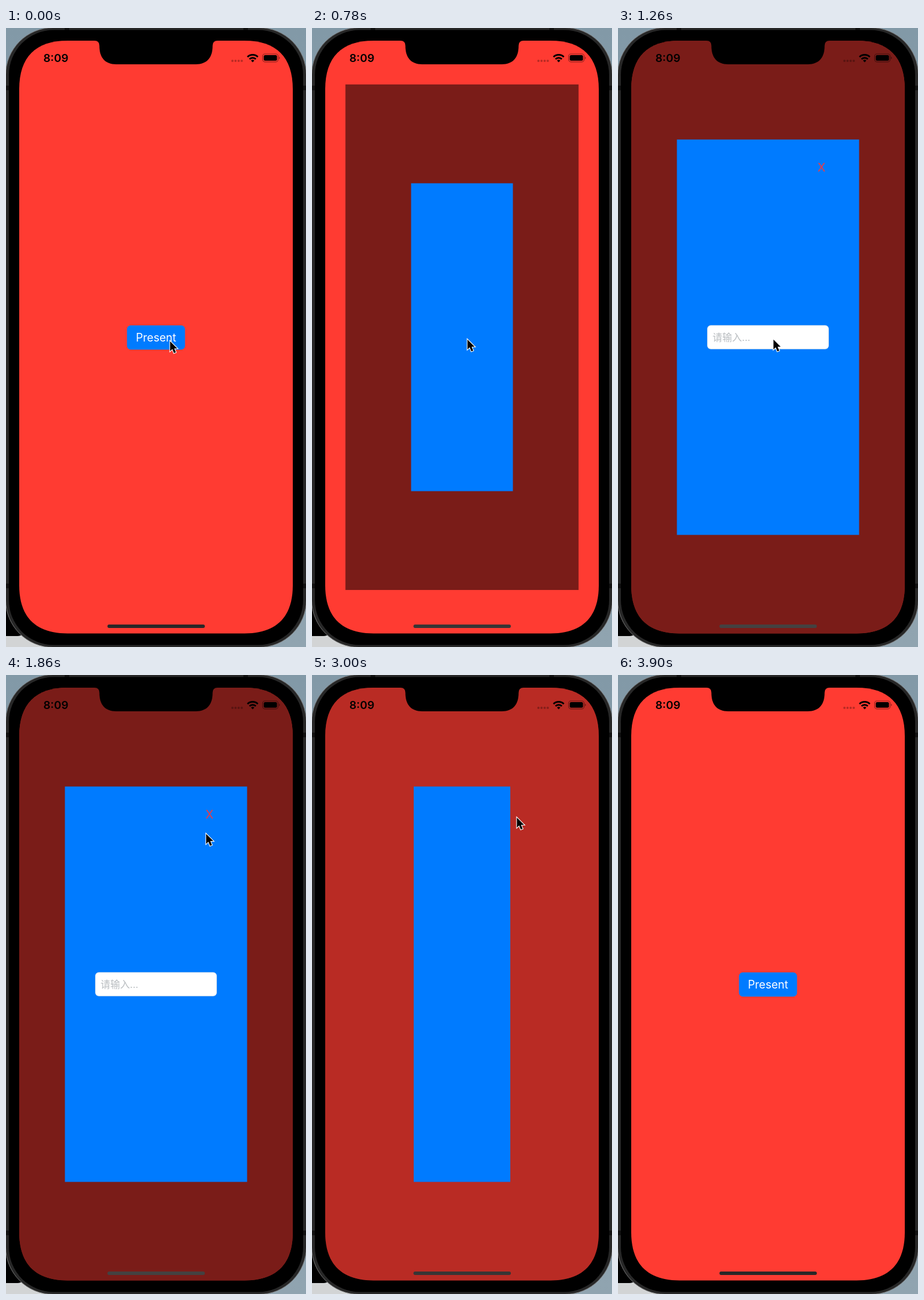
Animation of 522x1074 px, one loop 4200 ms. Source, as an HTML page:

```html
<!DOCTYPE html>
<html lang="en">
<head>
<meta charset="utf-8">
<title>Modal presentation</title>
<style>
html, body { margin: 0; width: 100%; height: 100%; overflow: hidden; background: #000; }
svg { display: block; width: 522px; height: 1074px; }
text { font-family: Inter, "Noto Sans CJK SC", "Noto Sans CJK", sans-serif; }
</style>
</head>
<body>
<svg viewBox="0 0 522 1074">
  <defs>
    <linearGradient id="desk" x2="0" y2="1">
      <stop offset="0" stop-color="#8299a7"/><stop offset="1" stop-color="#90a4b0"/>
    </linearGradient>
    <clipPath id="screen">
      <path d="M107 22H415C470.500 22 499 50.500 499 106V967C499 1022 470.500 1050.500 415 1050.500H107C51.500 1050.500 23 1022 23 967V106C23 50.500 51.500 22 107 22Z"/>
    </clipPath>
    <clipPath id="fieldClip"><rect id="fieldMask" y="516" height="41"/></clipPath>
  </defs>

  <!-- desktop and phone body -->
  <rect width="522" height="1074" fill="url(#desk)"/>
  <path d="M0 1000H110V1074H0Z" fill="#d2d4d5"/>
  <rect x="-30" y="1000" width="64" height="55" rx="14"/>
  <rect x="-.5" y="-.5" width="523" height="1075" rx="82" fill="#272727" stroke="#777"/>
  <path d="M0 104H5M0 968H5M517 104H522M517 968H522M106 0V4M417 0V4" stroke="#111" stroke-width="8"/>
  <rect x="5" y="3.500" width="512" height="1067" rx="78"/>

  <g clip-path="url(#screen)">
    <rect x="20" y="20" width="482" height="1034" fill="#ff3b32"/>
    <rect id="button" x="210.500" y="516" width="101" height="42" rx="6.500" fill="#007bff"/>
    <text id="label" x="261" y="544" font-size="19.400" text-anchor="middle">Present</text>
    <rect id="dim" opacity=".52"/>
    <rect id="panel" fill="#007bff"/>
    <g id="content">
      <rect id="field" y="516" height="41" rx="6" fill="#fff" stroke="#d5dde5" stroke-width=".7"/>
      <g clip-path="url(#fieldClip)">
        <text id="hint" y="543" font-size="17" fill="#b9bdc0">请输入...</text>
      </g>
      <text id="close" x="354" y="249" font-size="20" text-anchor="middle" fill="#f03b43">X</text>
    </g>
    <path d="M154 20V22Q162.500 22 162.500 31C162.500 51 172 63 192 63H330C350 63 359.500 51 359.500 31Q359.500 22 368 22V20Z"/>
    <rect id="home" x="176.500" y="1035" width="169.500" height="6" rx="3"/>
  </g>

  <!-- status bar -->
  <text x="65" y="59" font-size="19.300" font-weight="600">8:09</text>
  <path d="M394 57h.01M399.400 57h.01M404.800 57h.01M410.200 57h.01" stroke="#000" stroke-opacity=".28" stroke-width="4" stroke-linecap="round"/>
  <g fill="none" stroke="#000" stroke-width="2.900">
    <path d="M420.200 50.300A12.700 12.700 0 0 1 438.200 50.300M423.700 54A7.800 7.800 0 0 1 434.700 54"/>
    <path d="M429.200 59.500L426.300 56.500A4.300 4.300 0 0 1 432.100 56.500Z" fill="#000" stroke="none"/>
  </g>
  <rect x="446.500" y="45" width="27" height="13.800" rx="4" fill="none" stroke="#000" stroke-opacity=".42" stroke-width="1.200"/>
  <rect x="448.500" y="47" width="23" height="9.800" rx="2.500"/>
  <path d="M475 49.500Q478 51.900 475 54.300Z" opacity=".45"/>

  <g id="ring" fill="none">
    <circle r="25.600" stroke="#fff" stroke-width="2"/>
    <circle r="26.700" stroke="#000" stroke-width="1.800"/>
    <circle r="24.500" stroke="#000" stroke-width=".9"/>
  </g>
  <path id="cursor" d="M0 0V17.300L3.900 13.600L6.800 20.600L10.100 19.200L7.200 12.400H12.500Z" stroke="#fff" stroke-width="2.200" paint-order="stroke"/>
</svg>
<script>
const LOOP = 4200, STEP = 60, LAST = 3900;
const CX = 261, CY = 536.5, W = 317, H = 686, SCREEN_W = 476, SCREEN_H = 1029;
const $ = id => document.getElementById(id);
const mix = (a, b, p) => a + (b - a) * p;
const span = (t, start, length) => Math.min(1, Math.max(0, (t - start) / length));
const easeOut = p => 1 - (1 - p) ** 3;

// cubic-bezier(.42, 0, .58, 1)
function ease(x) {
  if (x <= 0 || x >= 1) return x;
  let lo = 0, hi = 1, s;
  for (let i = 0; i < 24; i++) {
    s = (lo + hi) / 2;
    const r = 1 - s;
    if (1.26 * s * r * r + 1.74 * s * s * r + s ** 3 < x) lo = s; else hi = s;
  }
  return s * s * (3 - 2 * s);
}

function set(id, attrs) {
  for (const name in attrs) $(id).setAttribute(name, attrs[name]);
}
const show = (id, on) => set(id, { display: on ? "inline" : "none" });
const centered = (id, width, height) =>
  set(id, { x: CX - width / 2, y: CY - height / 2, width, height });

function cursorAt(t) {
  const legs = [[0, 300, 270.5, 540.5], [1600, 480, 356.5, 247.5]];
  let x = 285.5, y = 543.5;
  for (const [start, length, toX, toY] of legs) {
    const p = easeOut(span(t, start, length));
    x = mix(x, toX, p);
    y = mix(y, toY, p);
  }
  const leave = ease(span(t, 3200, 640));
  return [mix(x, 300, leave), mix(y, 1082, leave)];
}

function draw(t) {
  const open = ease(span(t, 620, 300));
  const fieldIn = ease(span(t, 960, 300));
  const fieldOut = ease(span(t, 2565, 300));
  const shut = ease(span(t, 2855, 300));
  const presented = t > 620 && t < 3155;
  const pressed = t >= 480 && t < 620;
  const closePressed = t >= 2430 && t < 2565;

  set("button", { "fill-opacity": pressed ? .75 : 1 });
  set("label", { fill: pressed ? "#bfd5f5" : "#fff" });

  show("dim", presented);
  show("panel", presented);
  centered("dim", mix(W, SCREEN_W, open), mix(H, SCREEN_H, open));
  set("dim", { opacity: .52 * (1 - shut) });
  centered("panel", mix(1, W, open) - (W - 1) * shut, mix(H / 2, H, open));

  show("content", t > 960 && fieldOut < 1);
  const width = 211 * fieldIn * (1 - fieldOut), left = CX - width / 2;
  set("field", { x: left, width });
  set("fieldMask", { x: left, width });
  set("hint", { x: left + 9 });
  show("hint", fieldOut === 0);
  set("close", {
    opacity: fieldIn * (closePressed ? .4 : 1),
    transform: `translate(354 241) rotate(${180 * fieldOut}) scale(${1 - .9 * fieldOut}) translate(-354 -241)`
  });

  const tone = Math.round(mix(42, 68, open * (1 - shut)));
  set("home", { fill: `rgb(${tone},${tone - 3},${tone - 3})` });

  const [x, y] = cursorAt(t);
  set("cursor", { transform: `translate(${x} ${y})` });
  set("ring", { transform: `translate(${x - 1} ${y + .5})` });
  show("ring", pressed || closePressed);
  show("cursor", t < LAST);
}

function tick(now) {
  draw(Math.min(LAST, Math.floor(now % LOOP / STEP) * STEP));
  requestAnimationFrame(tick);
}
tick(performance.now());
</script>
</body>
</html>
```
